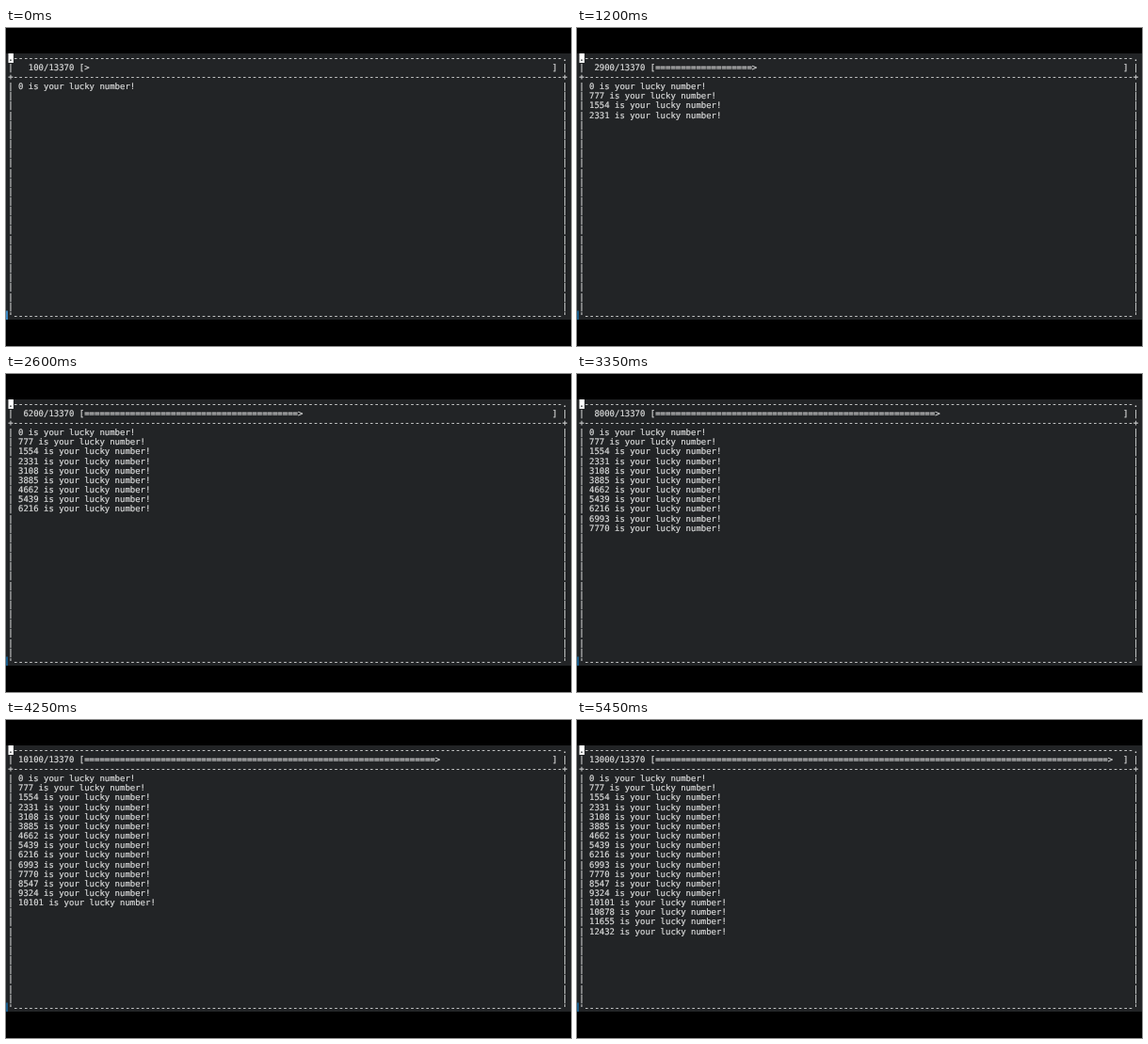
Animation, 600 px wide and 338 px high, one loop 5500 ms. Source, as an HTML page:

```html
<!DOCTYPE html>
<html lang="en">
<head>
<meta charset="utf-8">
<title>Lucky numbers</title>
<style>
html, body { margin: 0; width: 100%; height: 100%; overflow: hidden; background: #000; }
svg { display: block; width: 100vw; height: 100vh; }
text {
  font: 8.98px "DejaVu Sans Mono", monospace;
  fill: #dadbdb;
  stroke: #dadbdb;
  stroke-width: .2px;
  white-space: pre;
  text-rendering: geometricPrecision;
}
</style>
</head>
<body>
<svg id="stage" viewBox="0 0 600 338">
  <rect width="600" height="338" fill="#000"/>
  <rect y="27" width="600" height="283" fill="#222426"/>
  <rect id="tab" y="300.5" width="2" height="9.5"/>
  <rect x="2.5" y="27" width="5.4" height="10" fill="#fff"/>
</svg>
<script>
const COLS = 110, ROWS = 28, CELL_H = 10.16;
const TOTAL = 13370, LUCKY = 777, BAR = 92;
const LOOP = 5500, STEP = 50, TICKS = 108;
const stage = document.getElementById('stage');
const tab = document.getElementById('tab');

function addRow(y) {
  const el = document.createElementNS('http://www.w3.org/2000/svg', 'text');
  el.setAttribute('x', 2.2);
  el.setAttribute('y', 34.6 + y * CELL_H);
  stage.appendChild(el);
  return el;
}

const rows = Array.from({ length: ROWS }, (_, y) => addRow(y));
const rule = end => end + '-'.repeat(COLS - 2) + end;
const boxed = s => '|' + (' ' + s).padEnd(COLS - 2) + '|';

function setRow(y, s) {
  if (rows[y].textContent !== s) rows[y].textContent = s;
}

setRow(0, ' ' + rule('.').slice(1));
setRow(2, rule('+'));
setRow(ROWS - 1, rule("'"));
const dot = addRow(0);
dot.textContent = '.';
dot.style.fill = dot.style.stroke = '#222426';

function draw(t) {
  const tick = Math.max(0, Math.floor(t / STEP) - 1);
  const count = 100 * (1 + Math.floor(tick * 129 / TICKS + 0.6));
  const bar = '='.repeat(Math.floor(count / TOTAL * BAR)) + '>';
  setRow(1, boxed(`${String(count).padStart(5)}/${TOTAL} [${bar.padEnd(BAR)}]`));
  for (let y = 3; y < ROWS - 1; y++) {
    const n = (y - 3) * LUCKY;
    setRow(y, boxed(n < count + 100 ? `${n} is your lucky number!` : ''));
  }
  tab.setAttribute('fill', tick ? '#175a88' : '#3a86c0');
}

const start = performance.now();
function frame() {
  draw((performance.now() - start) % LOOP);
  requestAnimationFrame(frame);
}
frame();
</script>
</body>
</html>
```
